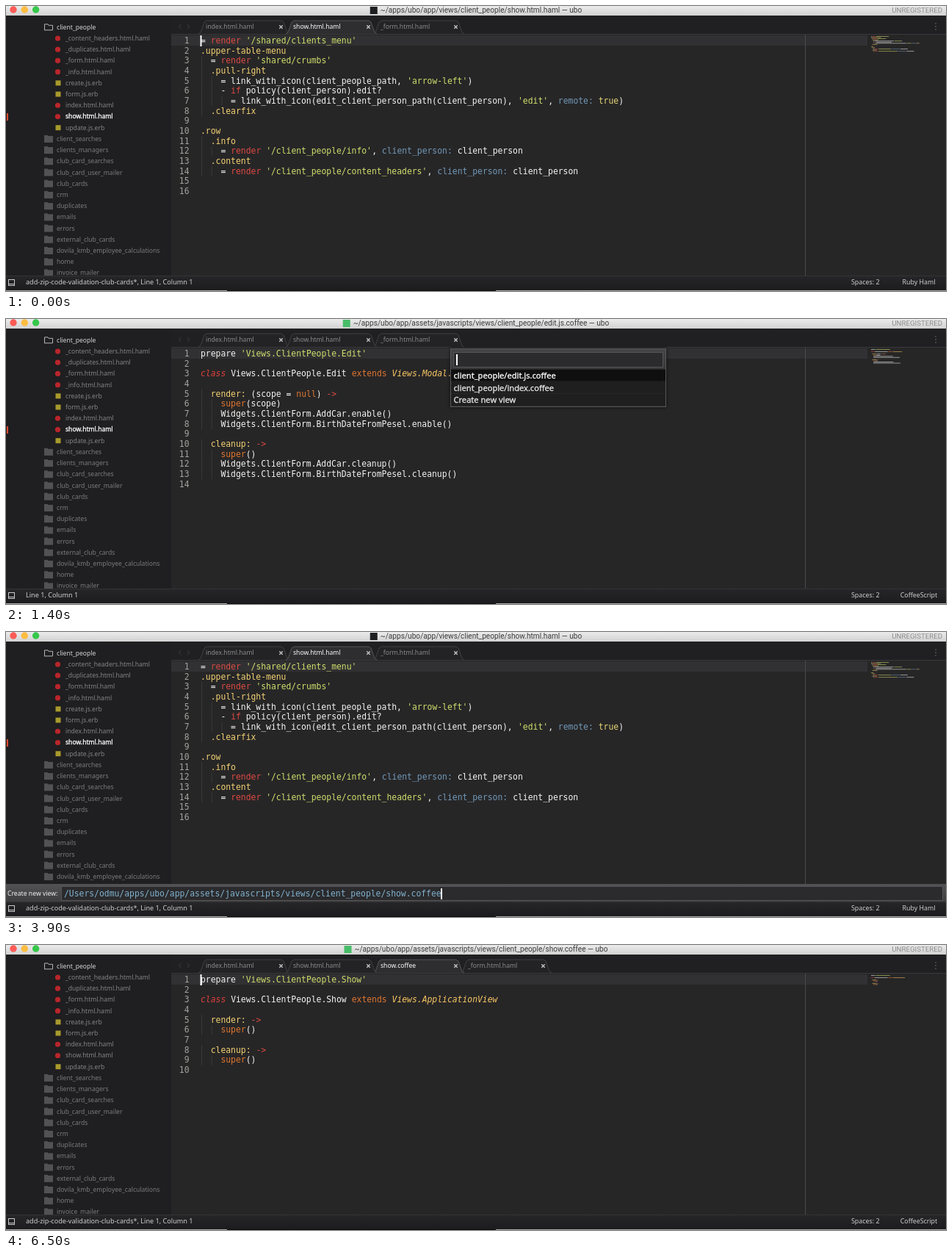
Write an HTML page with a canvas that moves like this. It is 1280x388 px and loops after 6.6 s.

```html
<!DOCTYPE html>
<html lang="en">
<head>
<meta charset="utf-8">
<title>Editor: create a view</title>
<style>
html, body { margin: 0; width: 100%; height: 100%; overflow: hidden; background: #272627; }
canvas { display: block; }
</style>
</head>
<body>
<canvas id="stage" width="1280" height="388"></canvas>
<script>
const ctx = document.getElementById('stage').getContext('2d');
const LOOP = 6600, STEP = 100;
const CHAR = 6.857, LINE = 13.67, CODE_X = 265;
const mono = '11.39px "DejaVu Sans Mono", monospace';
const ui = (size = 8.6, weight = '') => `${weight} ${size}px "Noto Sans", sans-serif`;
const titleFont = size => `${size}px Roboto, sans-serif`;

// Moments of the session, in ms
const PALETTE = 400, QUICK = 1300, INDEX = 2300, CREATE = 3000, CHOSEN = 3600, INPUT = 3700, OPENED = 5100;
const BRANCH_DELAY = 400;

const folder = '~/apps/ubo/app/', assets = 'assets/javascripts/views/client_people/';
const haml = `= render '/shared/clients_menu'
.upper-table-menu
  = render 'shared/crumbs'
  .pull-right
    = link_with_icon(client_people_path, 'arrow-left')
    - if policy(client_person).edit?
      = link_with_icon(edit_client_person_path(client_person), 'edit', remote: true)
  .clearfix

.row
  .info
    = render '/client_people/info', client_person: client_person
  .content
    = render '/client_people/content_headers', client_person: client_person

`;
const emptyView = name => `prepare 'Views.ClientPeople.${name}'

class Views.ClientPeople.${name} extends Views.ApplicationView

  render: ->
    super()

  cleanup: ->
    super()
`;
const editView = `prepare 'Views.ClientPeople.Edit'

class Views.ClientPeople.Edit extends Views.Modal.Form

  render: (scope = null) ->
    super(scope)
    Widgets.ClientForm.AddCar.enable()
    Widgets.ClientForm.BirthDateFromPesel.enable()

  cleanup: ->
    super()
    Widgets.ClientForm.AddCar.cleanup()
    Widgets.ClientForm.BirthDateFromPesel.cleanup()
`;
const documents = {
  haml: { path: 'views/client_people/show.html.haml', code: haml, syntax: 'Ruby Haml', icon: '#1d1f20' },
  edit: { path: assets + 'edit.js.coffee', code: editView },
  index: { path: assets + 'index.coffee', code: emptyView('Index') },
  show: { path: assets + 'show.coffee', code: emptyView('Show') }
};

const sidebar = `client_people _content_headers.html.haml _duplicates.html.haml _form.html.haml
_info.html.haml create.js.erb form.js.erb index.html.haml show.html.haml update.js.erb client_searches
clients_managers club_card_searches club_card_user_mailer club_cards crm duplicates emails errors
external_club_cards dovila_kmb_employee_calculations home invoice_mailer`.split(/\s+/);

// Asterisks enclose the matched letters
const commands = ['*Open* JavaScript View Name', 'codnib: *open* issues', 'codnib: *open* repo',
  'BTorp: *open* corresponding file', 'Tombrel Files: *Open* Navigator', 'Kilta *Open*View',
  'codnib: *open* file on remote', 'File: *Open* In Browser – Production Server',
  'File: *Open* In Browser – Testing Server', 'Kilta Latest Migration: *Open* latest Kilta migration',
  'TombrelLinter: Report (*Open* Files)', 'View: Toggle *Open* Files in Side Bar',
  'File: C*op*y Name *En*coded', 'FenceHueSpotlight: Select Tag Name (closing and *open*ing)',
  'File: C*o*py *P*ath From Project *En*coded'];
const views = ['client_people/edit.js.coffee', 'client_people/index.coffee', 'Create new view'];

const syntax = new RegExp([
  "(?<string>'.*?')", '(?<name>^\\s*\\.[\\w-]+|\\b(?:render|cleanup):)', '(?<key>\\b\\w+:)',
  '(?<word>\\b(?:render|if)\\b|->)', '(?<keyword>\\bclass\\b)', '(?<call>\\b(?:extends|super|null)\\b)',
  '(?<parent>(?<=extends )[\\w.]+)', '(?<bool>\\btrue\\b)'].join('|'), 'g');
const colors = { string: '#cfe06c', name: '#f3d272', key: '#7199b8', word: '#dd4a43', keyword: '#e0413c',
  call: '#e0762f', parent: '#fac863', bool: '#e6d676', plain: '#f4f4f2' };

function rect(x, y, w, h, color) { ctx.fillStyle = color; ctx.fillRect(x, y, w, h); }

function frame(x, y, w, h, color) {
  ctx.strokeStyle = color; ctx.lineWidth = 1;
  ctx.strokeRect(x + .5, y + .5, w - 1, h - 1);
}

function dot(x, y, r, color) {
  ctx.fillStyle = color; ctx.beginPath(); ctx.arc(x, y, r, 0, 7); ctx.fill();
}

function line(points, color, width = 1, fill) {
  ctx.beginPath();
  points.forEach(([x, y]) => ctx.lineTo(x, y));
  if (fill) { ctx.fillStyle = fill; ctx.fill(); }
  ctx.strokeStyle = color; ctx.lineWidth = width; ctx.stroke();
}

function text(str, x, y, color, font = ui(), align = 'left') {
  ctx.font = font; ctx.fillStyle = color; ctx.textAlign = align;
  ctx.fillText(str, x, y);
  return ctx.measureText(str).width;
}

function strongText(str, x, y, color = '#fff', font = ui()) {
  const width = text(str, x, y, color, font);
  ctx.strokeStyle = color; ctx.lineWidth = .3;
  ctx.strokeText(str, x, y);
  return width;
}

function clipped(x, y, w, h, draw) {
  ctx.save(); ctx.beginPath(); ctx.rect(x, y, w, h); ctx.clip();
  draw();
  ctx.restore();
}

function shade(y, h, from, to) {
  const g = ctx.createLinearGradient(0, y, 0, y + h);
  g.addColorStop(0, from); g.addColorStop(1, to);
  return g;
}

// Soft blink, one second per cycle
function caret(x, y, h, age) {
  ctx.globalAlpha = Math.max(0, Math.min(1, .5 + 1.6 * Math.cos((age - 200) * Math.PI / 500)));
  rect(x, y, 2, h, '#fff');
  ctx.globalAlpha = 1;
}

function tokens(source) {
  const parts = [];
  let end = 0;
  for (const m of source.matchAll(syntax)) {
    const kind = Object.keys(m.groups).find(k => m.groups[k]);
    parts.push(['plain', source.slice(end, m.index), end], [kind, m[0], m.index]);
    end = m.index + m[0].length;
  }
  return [...parts, ['plain', source.slice(end), end]];
}

function drawTitle(doc) {
  rect(0, 0, 1280, 13, shade(0, 13, '#ebebeb', '#d2d2d2'));
  ['#fc5b57', '#fdbd41', '#35c84b'].forEach((c, i) => dot(10 + i * 15.3, 5, 4.7, c));
  const title = folder + doc.path + ' — ubo';
  ctx.font = titleFont(10.15);
  const x = 640 - (ctx.measureText(title).width + 14) / 2;
  rect(x, 1, 10, 10, doc.icon || '#48bd69');
  text(title, x + 14, 9, '#3c3c3c', titleFont(10.15));
  text('UNREGISTERED', 1275, 8.5, '#8b8b8b', titleFont(9.7), 'right');
}

function drawSidebar(selected, marker) {
  rect(0, 13, 225, 354, '#1f1e20');
  sidebar.forEach((name, i) => {
    const y = 28.8 + i * 15.21, file = name.includes('.');
    if (name.endsWith('haml')) dot(70.5, y, 3.6, '#b8262b');
    else if (file) rect(67.5, y - 3.5, 7, 7, '#a89a2c');
    else if (i) {
      rect(52, y - 5, 5, 3, '#525153');
      rect(52, y - 4, 12, 9, '#525153');
    } else line([[52.5, y + 4], [52.5, y - 4], [57, y - 4], [58, y - 2.5], [63.5, y - 2.5], [63.5, y + 4], [52, y + 4]], '#b5b5b5');
    const x = file ? 81 : 69;
    if (selected && name === 'show.html.haml') strongText(name, x, y + 3);
    else text(name, x, y + 3, i ? file ? '#858486' : '#7c7b7d' : '#d6d6d6');
  });
  if (marker) rect(1, 146, 2, 10, marker);
}

function drawTab(x, name, active) {
  const shape = [[x, 38], [x + 3, 36], [x + 8, 22], [x + 11, 20], [x + 113, 20], [x + 116, 22], [x + 121, 36], [x + 124, 38]];
  line(shape, active ? '#565557' : '#414042', 1, active ? '#2e2d2f' : '#232224');
  text(name, x + 10, 31, active ? '#fff' : '#8c8b8d');
  const cx = x + 112.5, cy = 28.5;
  [1, -1].forEach(s => line([[cx - 2.2, cy - 2.2 * s], [cx + 2.2, cy + 2.2 * s]], '#c4c4c4', 1.3));
}

function drawTabs(t) {
  rect(225, 13, 1055, 25, '#201f21');
  [[238, -1], [247, 1]].forEach(([x, d]) => line([[x, 25], [x + 2.5 * d, 28], [x, 31]], '#3f3e40'));
  [24, 28, 32].forEach(y => dot(1266, y, .9, '#555'));
  rect(225, 38, 1055, 1, '#39383a');
  const slide = Math.max(0, Math.min(1, (t - OPENED) / 280));
  drawTab(500 + 119 * slide, '_form.html.haml');
  if (slide === 1) drawTab(500, 'show.coffee', true);
  drawTab(262, 'index.html.haml');
  drawTab(381, 'show.html.haml', documentAt(t) === documents.haml);
}

function drawEditor(doc) {
  rect(225, 39, 1055, 328, '#272627');
  rect(225, 40, 948, 14, '#313032');
  rect(1088, 39, 1, 328, '#4a494b');
  doc.code.split('\n').forEach((source, i) => {
    const y = 51 + i * LINE;
    text(i + 1, 249.5, y, '#a2a29d', mono, 'right');
    const indent = source.search(/\S/);
    for (let col = 0; col < indent; col += 2) rect(CODE_X + 1 + col * CHAR, y - 10.5, 1, LINE, '#39383a');
    for (const [kind, part, col] of tokens(source)) {
      const italic = kind === 'keyword' || kind === 'parent' ? 'italic ' : '';
      text(part, CODE_X + col * CHAR, y, colors[kind], italic + mono);
      ctx.globalAlpha = .6;
      for (const word of part.matchAll(/\S+/g))
        rect(1178 + (col + word.index) * .78, 41 + i * 1.55, word[0].length * .78, .9, colors[kind]);
      ctx.globalAlpha = 1;
    }
  });
}

function drawStatus(doc, branch) {
  rect(0, 367, 1280, 20, shade(367, 20, '#262527', '#1c1b1d'));
  rect(0, 367, 1280, 1, '#333234');
  frame(3, 372, 9, 9, '#c8c8c8');
  rect(4, 378, 7, 1, '#c8c8c8');
  text((branch ? 'add-zip-code-validation-club-cards*, ' : '') + 'Line 1, Column 1', 27, 379.3, '#cfcfcf', ui(9.1));
  text('Spaces: 2', 1151, 379.3, '#cfcfcf', ui(8.9));
  text(doc.syntax || 'CoffeeScript', 1243, 379.3, '#cfcfcf', ui(8.8), 'center');
  rect(0, 387, 1280, 1, '#a9aaa6');
  rect(301, 387, 366, 1, '#0c0c0c');
}

function drawPanel(x, w, h, items, selected) {
  ctx.shadowColor = '#000a'; ctx.shadowBlur = 5;
  rect(x, 40, w, h, '#1f1f20');
  ctx.shadowBlur = 0; ctx.shadowColor = 'transparent';
  rect(x, 40, w, 29, shade(40, 29, '#454446', '#373638'));
  rect(x + 4, 45, w - 8, 21, '#2b2a2c');
  frame(x + 4, 45, w - 8, 21, '#555456');
  clipped(x, 40, w, h, () => items.forEach((item, i) => {
    const top = 68.6 + i * 16.72, on = i === selected;
    rect(x, top, w, 16.72, on ? '#0f0f10' : '#1f1f20');
    rect(x, top + 16, w, .8, '#2d2c2e');
    let tx = x + 4.5;
    item.split('*').forEach((part, k) => {
      const bold = k % 2 === 1, color = on ? '#fff' : bold ? '#8fd0f0' : '#e6e6e6';
      const write = bold ? text : strongText;
      tx += write(part, tx, top + 12.2, color, ui(11.1, bold ? 'bold' : ''));
    });
  }));
  frame(x, 40, w, h, '#59585a');
}

function drawPalette(age) {
  drawPanel(536, 433, 274, commands, 0);
  clipped(940, 136, 21, 16, () => text('⌃⌘N', 943, 147, '#9a9a9a', '10px "DejaVu Sans", sans-serif'));
  rect(961, 70, 6, 243, '#1f1f20');
  ctx.fillStyle = '#59585a';
  ctx.beginPath(); ctx.roundRect(961, 71, 5, 100, 2.5); ctx.fill();
  rect(544, 48, 28, 15, '#3b5674');
  text('open', 544.5, 59.5, '#d0505a', mono);
  caret(571, 48, 15, age);
}

function drawInput(age) {
  rect(0, 343, 1280, 24, shade(343, 24, '#525153', '#3e3d3f'));
  rect(75, 346, 1201, 20, '#2b2a2c');
  frame(75, 346, 1201, 20, '#555456');
  text('Create new view:', 2, 359, '#f0f0f0', ui(8.66));
  text('/Users/odmu/apps/ubo/app/' + assets + 'show.coffee', 79, 360, '#7fb2d0', mono);
  caret(592, 349, 15, age);
}

function documentAt(t) {
  if (t >= OPENED) return documents.show;
  if (t < QUICK || t >= CREATE) return documents.haml;
  return t < INDEX ? documents.edit : documents.index;
}

function draw(t) {
  const doc = documentAt(t);
  drawEditor(doc);
  drawTabs(t);
  drawSidebar(t < OPENED, t < OPENED ? '#e2492f' : t < OPENED + 300 ? '#8a2520' : null);
  drawTitle(doc);
  // The branch name arrives a moment after a file is opened
  drawStatus(doc, ![QUICK, OPENED].some(at => t >= at && t < at + BRANCH_DELAY));
  if (t < PALETTE) caret(CODE_X - .5, 40, 15, t);
  else if (t < QUICK) drawPalette(t - PALETTE);
  else if (t < CHOSEN) {
    drawPanel(605, 294, 80, views, t < INDEX ? 0 : t < CREATE ? 1 : 2);
    caret(613, 48, 15, t - QUICK);
  } else if (t < INPUT) caret(CODE_X - .5, 40, 15, t - CHOSEN);
  else if (t < OPENED) drawInput(t - INPUT);
  else caret(CODE_X - .5, 40, 15, t - OPENED);
}

const start = performance.now();
function tick() {
  const t = (performance.now() - start) % LOOP;
  draw(Math.floor(t / STEP) * STEP);
  requestAnimationFrame(tick);
}
tick();
</script>
</body>
</html>
```
